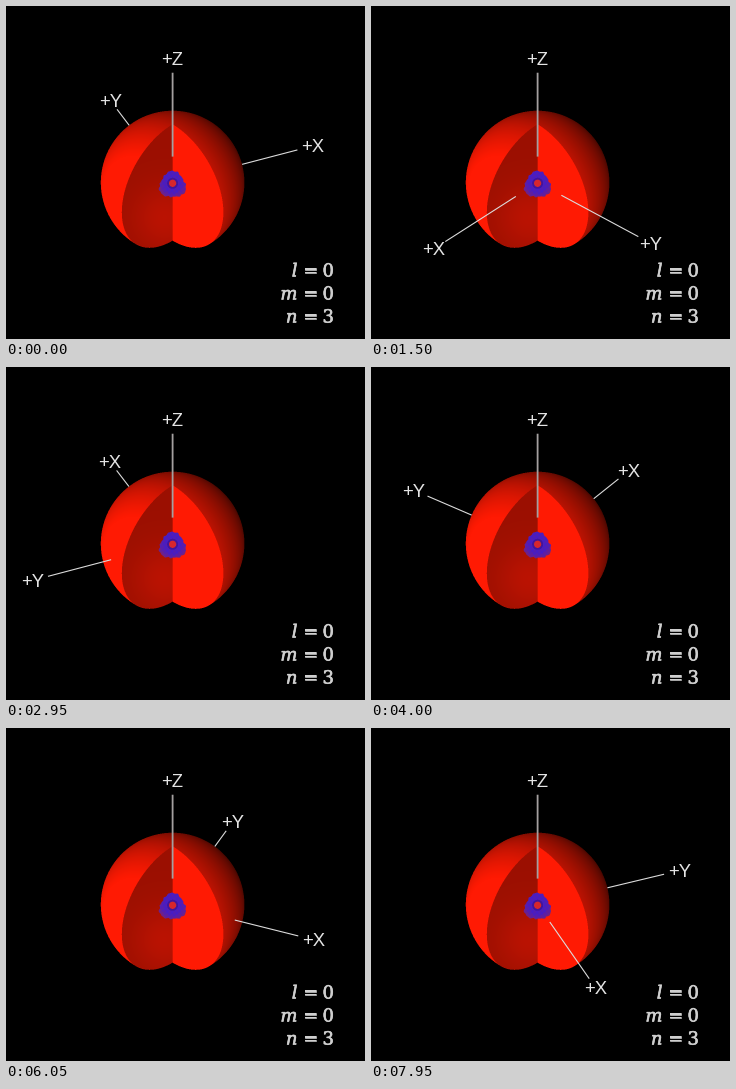
A matplotlib script that plays this animation: 359x333 px, repeating every 8 s.

```python
import numpy as np
import matplotlib.pyplot as plt
from matplotlib import patheffects
from matplotlib.animation import FuncAnimation

W, H, DPI = 359, 333, 100
PX = 72 / DPI                      # one pixel in points
FRAMES, STEP = 160, 50
CX, CY = 166.6, 176.5
AXIS = 153.5                       # label distance from the centre
TILT = np.arcsin(90 / AXIS)        # camera elevation
SE, CE = np.sin(TILT), np.cos(TILT)
BALL = 71.8
LINE_IN, LINE_OUT = 0.21, 0.89

# azimuth of +X in degrees over time in seconds
KEY_T = np.array([0, 0.85, 1.5, 1.7, 2.55, 2.95, 3.4, 4.0, 4.25, 5.2, 6.05, 6.8, 7.65, 7.95])
KEY_A = np.array([384, 292, 227.5, 206.5, 138, 114.2, 84.5, 53.7, 41.2, 5, -23.1, -43.5,
                  -62.3, -67.8])
KEY_V = np.gradient(KEY_A, KEY_T)


def azimuth(t):
    """Smooth Hermite curve through the keys."""
    i = int(np.clip(np.searchsorted(KEY_T, t, side="right") - 1, 0, len(KEY_T) - 2))
    h = KEY_T[i + 1] - KEY_T[i]
    s = (t - KEY_T[i]) / h
    return ((1 + 2 * s) * (1 - s) ** 2 * KEY_A[i] + s * (1 - s) ** 2 * h * KEY_V[i]
            + s * s * (3 - 2 * s) * KEY_A[i + 1] + s * s * (s - 1) * h * KEY_V[i + 1])


def render_ball(ss=3):
    """Sphere with a quarter wedge cut out of its front, and the inner shells."""
    x, y = np.meshgrid((np.arange(W * ss) + 0.5) / ss - CX,
                       CY - (np.arange(H * ss) + 0.5) / ss)
    red = np.array([255, 26, 3])
    img = np.zeros((H * ss, W * ss, 3))

    # outer surface, lit from the lower left
    d2 = BALL ** 2 - x ** 2 - y ** 2
    d = np.sqrt(np.maximum(d2, 0))
    skin = (d2 > 0) & (d * CE - y * SE <= np.abs(x))
    lit = np.clip(0.6 + 0.55 * (-0.55 * x - 0.35 * y + 0.75 * d) / BALL, 0, 1)
    img[skin] = lit[skin][:, None] * red

    # the two flat cut faces, meeting on the vertical axis
    rho = np.abs(x) * np.sqrt(2)
    z = (y + SE * np.abs(x)) / CE
    face = np.hypot(rho, z) < BALL
    glow = np.exp(-((x + 8) ** 2 + (y + 35) ** 2) / 1100)
    side = np.where(x < 0, 0.61 + 0.12 * glow, 1)
    img[face] = side[face][:, None] * red

    # blue shell: a bumpy rounded triangle, mottled towards its lower rim
    by = y + 2.5
    ang, r = np.arctan2(by, x), np.hypot(x, by)
    rim = 13 - 1.2 * np.sin(3 * ang) + 0.4 * np.sin(11 * ang + 1) + 0.3 * np.sin(17 * ang)
    mottle = 0.5 + 0.25 * np.sin(1.5 * x + 0.9 * y) + 0.25 * np.sin(1.3 * y - 1.1 * x + 2)
    low = np.clip((r - 8) / 5, 0, 1) * np.clip(0.5 - by / 16, 0, 1)
    mix = np.clip(0.35 * mottle + 0.6 * low, 0, 1)[..., None]
    shell = (1 - mix) * np.array([66, 28, 205]) + mix * np.array([125, 35, 115])
    blob = r < rim
    img[blob] = shell[blob]
    core = np.hypot(x, y + 0.8)
    img[core < 5.5] = (66, 20, 155)
    img[core < 3.6] = (215, 38, 45)

    img = img.reshape(H, ss, W, ss, 3).mean(axis=(1, 3))
    return img.astype(np.uint8)


fig = plt.figure(figsize=(W / DPI, H / DPI), dpi=DPI, facecolor="black")
ax = fig.add_axes([0, 0, 1, 1])
ax.imshow(render_ball(), extent=(0, W, H, 0), interpolation="nearest", aspect="auto")
ax.set(xlim=(0, W), ylim=(H, 0))
ax.axis("off")


def make_axis(name, color="#dcdcdc", width=1.1):
    line, = ax.plot([], [], color=color, lw=width * PX, solid_capstyle="butt",
                    snap=False, zorder=3)
    label = ax.text(0, 0, "+" + name, color="#e4e4e4", family="Liberation Sans",
                    size=18.5 * PX, ha="center", va="baseline", zorder=4)
    return line, label


def place(line, label, dx, dy, start):
    s = np.array([start, LINE_OUT])
    line.set_data(CX + dx * s, CY + dy * s)
    label.set_position((CX + dx, CY + dy + 6.3))


def place_flat(line, label, deg):
    """Put a horizontal axis at its azimuth, hiding what the ball covers."""
    a = np.radians(deg)
    dx, dy = AXIS * np.cos(a), -AXIS * SE * np.sin(a)
    if 220 <= deg % 360 <= 320:        # inside the open wedge
        start = LINE_IN
    elif np.sin(a) < 0:
        start = BALL / AXIS + 0.07 * np.sin(a)
    else:
        start = BALL / np.hypot(dx, dy)
    place(line, label, dx, dy, start)


x_axis, y_axis = make_axis("X"), make_axis("Y")
z_axis = make_axis("Z", "#a4a0a0", 1.8)
place(*z_axis, 0, 1 - AXIS * CE, LINE_IN)

# the view ends before the stage does
for left, right in ((0, 4), (329, W)):
    ax.axvspan(left, right, color="black", lw=0, zorder=5)

ink = "#cfcfcf"
font = dict(family="DejaVu Serif", size=18 * PX, color=ink, va="baseline", zorder=6,
            path_effects=[patheffects.withStroke(linewidth=0.6 * PX, foreground=ink)])
for row, (name, value) in enumerate(("l0", "m0", "n3")):
    base = 270.5 + 23 * row
    ax.text(291.5, base, name, style="italic", ha="right", **font)
    ax.text(304.5, base, "=", ha="center", **font)
    ax.text(328, base, value, ha="right", **font)


def update(i):
    deg = azimuth(i * STEP / 1000)
    place_flat(*x_axis, deg)
    place_flat(*y_axis, deg + 90)
    return [*x_axis, *y_axis]


anim = FuncAnimation(fig, update, frames=FRAMES, interval=STEP, repeat=True,
                     repeat_delay=0, blit=False)
plt.show()
```
